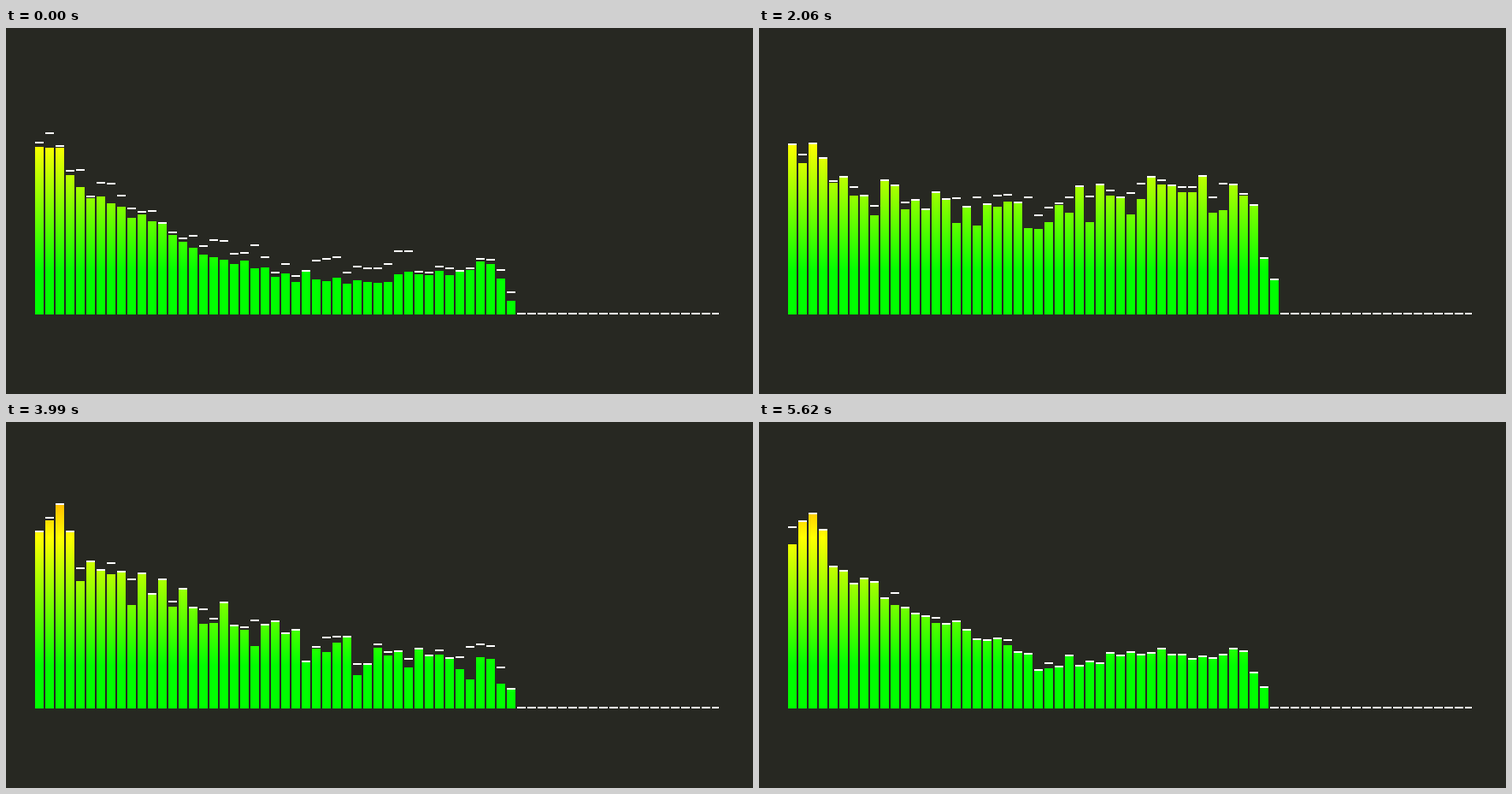
Recreate the animation shown at these times as an HTML page with a canvas. Size 874x428 px, loop 5.72 s.

```html
<!DOCTYPE html>
<html lang="en">
<head>
<meta charset="utf-8">
<title>Spectrum meter</title>
<style>
  html, body { margin: 0; width: 100%; height: 100%; overflow: hidden; background: #272822; }
  canvas { display: block; }
</style>
</head>
<body>
<canvas id="stage" width="874" height="428"></canvas>
<script>
const ctx = document.getElementById('stage').getContext('2d');
const LEFT = 34, RIGHT = 834, BASE = 335, PITCH = 12, BAR = 10, CAP = 2;
const COUNT = 67, LAST_BAR = 47, LAST_STEP = 38;
const LOOP = 5720, STEP_MS = 147.6, LEAD = 15;
const FALL = 0.06 * STEP_MS; // caps drop 60 px per second

// Envelope key points: bar heights at KNOTS, reached at the given step.
const KNOTS = [0, 2, 4, 14, 24, 34, 44, LAST_BAR];
const POSES = [
  { step: 0, heights: [197, 190, 150, 85, 45, 40, 58, 0] },
  { step: 5, heights: [197, 165, 160, 95, 57, 25, 50, 0] },
  { step: 11, heights: [200, 205, 148, 122, 132, 150, 150, 37] },
  { step: 18, heights: [190, 200, 160, 115, 75, 82, 90, 10] },
  { step: 23, heights: [222, 240, 168, 130, 85, 75, 70, 0] },
  { step: 30, heights: [200, 180, 160, 105, 45, 8, 8, 0] },
  { step: LAST_STEP, heights: [200, 235, 165, 105, 52, 63, 62, 0] }
];

const mix = (a, b, p) => a + (b - a) * p;

function random(step, bar) {
  let h = Math.imul(step * 131 + bar + 7, 0x9E3779B1);
  h = Math.imul(h ^ h >>> 15, 0x85EBCA6B);
  return ((h ^ h >>> 13) >>> 0) / 2 ** 32;
}

function envelope(heights, bar) {
  const k = Math.max(1, KNOTS.findIndex(n => n >= bar));
  return mix(heights[k - 1], heights[k], (bar - KNOTS[k - 1]) / (KNOTS[k] - KNOTS[k - 1]));
}

function level(step, bar) {
  if (bar > LAST_BAR) return 0;
  const k = Math.max(1, POSES.findIndex(pose => pose.step >= step));
  const from = POSES[k - 1], to = POSES[k];
  const p = (step - from.step) / (to.step - from.step);
  const v = mix(envelope(from.heights, bar), envelope(to.heights, bar), p * p);
  const spread = p % 1 ? 50 : 16; // livelier between poses
  const jitter = (random(step, bar) - .5) * spread * Math.min(1, v / 50);
  return Math.round(Math.min(250, v + jitter));
}

const frames = [];
for (let step = 0; step <= LAST_STEP; step++) {
  const last = frames[step - 1];
  frames.push(Array.from({ length: COUNT }, (_, bar) => {
    const v = level(step, bar);
    const held = last ? last[bar].cap - FALL : v && v + 28 * random(99, bar) ** 1.5;
    return { v, cap: Math.max(v, held) };
  }));
}

const paint = ctx.createLinearGradient(0, -15, 0, 285);
paint.addColorStop(0, '#f00');
paint.addColorStop(.5, '#ff0');
paint.addColorStop(1, '#0f0');

function draw(frame) {
  ctx.fillStyle = '#272822';
  ctx.fillRect(0, 0, 874, 428);
  frame.forEach(({ v, cap }, bar) => {
    const x = LEFT + bar * PITCH, w = Math.min(BAR, RIGHT - x), h = Math.max(v, CAP);
    ctx.fillStyle = paint;
    ctx.fillRect(x, BASE - h, w, h);
    ctx.fillStyle = '#fff';
    ctx.fillRect(x, BASE - CAP - Math.round(cap), w, CAP);
  });
}

const origin = performance.now();
function tick() {
  const time = (performance.now() - origin) % LOOP;
  draw(frames[Math.floor((time + LEAD) / STEP_MS)]);
  requestAnimationFrame(tick);
}
tick();
</script>
</body>
</html>
```
